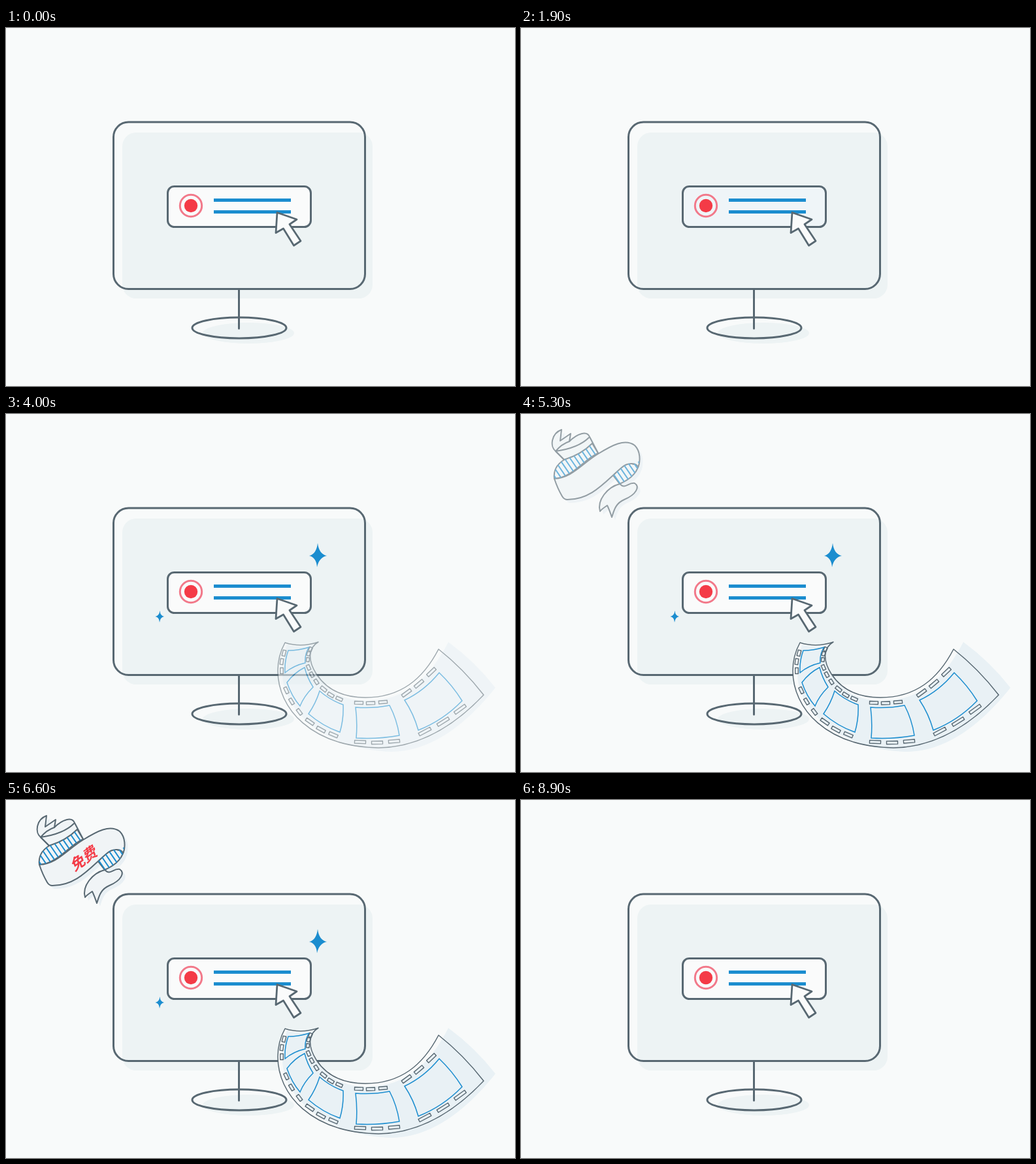
Write an HTML page that moves like this. It is 779 px wide and 548 px high and loops after 9.1 s.

```html
<!DOCTYPE html>
<html lang="zh">
<head>
<meta charset="utf-8">
<style>
html, body { margin: 0; width: 100%; height: 100%; overflow: hidden; background: #f8fafa; }
svg { display: block; width: 779px; height: 548px; }
.ink { stroke: #586872; stroke-linejoin: round; stroke-linecap: round; }
.blue { stroke: #1b8dcf; }
text { font: bold 22.5px "Noto Sans CJK SC", "Noto Sans CJK", sans-serif; fill: #f43b47; text-anchor: middle; }
</style>
</head>
<body>
<svg viewBox="0 0 779 548" fill="none">
  <defs>
    <clipPath id="foldA"><path d="M51 99C49 84 58 75 66 70Q92 62 109 45L118 60C98 68 78 98 51 99Z"/></clipPath>
    <clipPath id="foldB"><path d="M141 94C152 82 164 72 172 77L181 72C180 90 167 100 151 107Z"/></clipPath>
    <g id="ribbonShape">
      <path d="M53 57C44 50 46 30 62 24L60 41L76 30L74 42C86 30 101 25 105 35L118 60L66 70Z"/>
      <path d="M51 99C49 84 58 75 66 70Q92 62 109 45L118 60C98 68 78 98 51 99Z"/>
      <path d="M141 94C152 82 164 72 172 77L181 72C180 90 167 100 151 107Z"/>
      <path d="M151 107C160 116 164 104 174 106C182 111 177 123 158 131C144 137 142 149 139 158C137 152 135 146 132 140C129 142 124 145 121 149C116 132 132 112 151 107Z"/>
      <path d="M51 99C78 98 92 77 118 61C139 48 159 37 174 48C183 57 183 72 179 82C178 75 164 73 154 82C128 104 108 131 71 131Q66 131 63 126Q56 114 51 99Z"/>
    </g>
    <path id="strip" d="M427 350Q452 358 478 349C462 358 462 378 475 398C492 424 520 434 550 434C604 434 638 406 662 360Q700 390 731 430C695 468 640 510 570 511C466 509 416 450 416 393Q416 370 427 350Z"/>
  </defs>

  <rect x="178" y="160" width="383" height="254" rx="21" fill="#edf3f4"/>
  <ellipse cx="371" cy="467" rx="70" ry="16" fill="#edf3f4"/>
  <g class="ink" stroke-width="3">
    <rect x="164.5" y="144" width="385" height="255.500" rx="23"/>
    <ellipse cx="357" cy="459" rx="72" ry="16"/>
    <path d="M356.5 400V460"/>
    <rect id="panel" x="247.5" y="242.5" width="219" height="62" rx="10"/>
  </g>
  <circle cx="283" cy="272" r="16.7" stroke="#f2798a" stroke-width="3"/>
  <circle cx="283" cy="272" r="10.2" fill="#f43b47"/>
  <path class="blue" d="M318 263.5H436M318 281.5H436" stroke-width="5"/>

  <g id="sparks" fill="#1b8dcf">
    <path d="M477 198Q479 215 491 217.500Q479 220 476 235Q475 220 464 217.500Q475 215 477 198Z" transform="translate(0 -.5)"/>
    <path d="M235.500 301Q236 309 242 310Q236 311 235 319Q234.500 311 228.500 310Q234.500 309 235.500 301Z"/>
  </g>

  <path id="cursor" class="ink" d="M415 282.500L445 293L434 300.500L451 326L440.500 333L424.500 307L413 313.500Z" fill="#fafbfb" stroke-width="2.800"/>

  <g id="film">
    <use href="#strip" fill="#f8fafa"/>
    <path d="M430 353Q452 360 474 352C462 367 467 387 480 406C500 431 526 440 556 439C612 437 648 405 677 349Q718 379 749 419C713 464 660 516 590 517C486 514 423 451 423 398Q423 373 430 353Z" fill="#e9f1f5"/>
    <use href="#strip" class="ink" stroke-width="1.500"/>
    <path class="blue" stroke-width="1.500" d="M432 362Q448 362 464 357Q457 367 458 381Q440 385 427 396Q426 378 432 362Z
      M430 411Q441 396 457 388Q461 404 470 418Q456 432 450 447Q437 432 430 411Z
      M480 424Q496 438 516 445Q517 467 511 487Q485 478 463 459Q474 443 480 424Z
      M535 449Q562 451 587 446Q598 467 602 492Q569 498 536 496Q538 472 535 449Z
      M610 438Q640 424 663 396Q683 415 698 439Q669 469 631 484Q624 459 610 438Z"/>
    <path id="holes" class="ink" stroke-width="1.400"/>
  </g>

  <g id="ribbon">
    <use href="#ribbonShape" x="5" y="5" fill="#e9f0f4"/>
    <use href="#ribbonShape" class="ink" fill="#f0f4f6" stroke-width="2"/>
    <path class="ink" d="M53 57Q62 46 74 42M53 57L66 70M53 57C74 54 92 48 104 36" stroke-width="2"/>
    <path class="blue" clip-path="url(#foldA)" id="stripesA" stroke-width="2"/>
    <path class="blue" clip-path="url(#foldB)" id="stripesB" stroke-width="2"/>
  </g>
  <g id="label"><text transform="translate(120 89) rotate(-36) skewX(-16)" y="8">免费</text></g>
</svg>
<script>
const $ = id => document.getElementById(id);
const clamp = v => Math.max(0, Math.min(1, v));
const ramp = (t, a, b) => clamp((t - a) / (b - a));
const mix = (a, b, k) => a + (b - a) * k;

// Perforations: three centres per group, then the length of each hole
const groups = [
  [425.5, 366, 422, 379, 422, 393, 9],
  [466, 360, 463, 367, 462, 376, 6],
  [429, 423, 437, 440, 449, 456, 10],
  [463, 388, 468, 399, 475, 410, 8],
  [465, 471, 482, 483, 501, 491, 14],
  [486, 421, 497, 430, 510, 436, 10],
  [542, 502, 568, 503, 594, 501, 17],
  [540, 442, 558, 442.5, 577, 441, 13],
  [641, 486, 669, 471, 695, 452, 20],
  [613, 427, 632, 413, 651, 395, 16]
];

function hole(x, y, angle, length) {
  const c = Math.cos(angle), s = Math.sin(angle), w = length / 2, h = 2.3;
  const corners = [[-w, -h], [w, -h], [w, h], [-w, h]];
  return "M" + corners.map(([u, v]) => `${x + u * c - v * s} ${y + u * s + v * c}`).join("L") + "Z";
}

$("holes").setAttribute("d", groups.map(([ax, ay, bx, by, cx, cy, len]) =>
  hole(ax, ay, Math.atan2(by - ay, bx - ax), len) +
  hole(bx, by, Math.atan2(cy - ay, cx - ax), len) +
  hole(cx, cy, Math.atan2(cy - by, cx - bx), len)).join(""));

const stripes = (n, x, y, dx, dy) =>
  Array.from({ length: n }, (_, i) => `M${x + i * dx} ${y + i * dy}l22 32`).join("");
$("stripesA").setAttribute("d", stripes(12, 38, 76, 6, -3.7));
$("stripesB").setAttribute("d", stripes(7, 136, 84, 6, -3.7));

function cursorOffset(t) {
  if (t < 700) return [0, 0];
  const fly = ramp(t, 700, 1400), settle = ramp(t, 1400, 1700);
  return t < 1400 ? [mix(89, -11, fly), mix(52, -13, fly)]
                  : [mix(-11, 0, settle), mix(-13, 0, settle)];
}

function draw(t) {
  const out = 1 - ramp(t, 7920, 8900);
  const show = (id, alpha) => $(id).setAttribute("opacity", alpha);
  const place = (id, value) => $(id).setAttribute("transform", value);

  place("cursor", `translate(${cursorOffset(t)})`);
  show("cursor", t < 700 ? 1 : ramp(t, 600, 1150));

  const flash = clamp(1 - Math.abs(t - 2050) / 250);
  $("panel").setAttribute("fill", `rgb(${mix(250, 222, flash)},${mix(251, 236, flash)},${mix(251, 244, flash)})`);

  show("sparks", t < 2600 ? 0 : mix(0.3, 1, ramp(t, 2600, 3600)) * out);
  show("film", ramp(t, 3500, 4400) * out);

  show("ribbon", t < 5300 ? 0 : mix(0.63, 1, ramp(t, 5300, 5600)) * out);
  place("ribbon", `rotate(${11 * Math.sin(4 * Math.PI * ramp(t, 5300, 6200))} 116 92)`);

  const pop = ramp(t, 6200, 6600);
  show("label", pop * out);
  place("label", `translate(120 89) scale(${mix(1.08, 1, pop)}) translate(-120 -89)`);
}

const start = performance.now();
function tick() {
  const t = (performance.now() - start) % 9100;
  draw(Math.floor(t / 100) * 100); // ten poses per second
  requestAnimationFrame(tick);
}
tick();
</script>
</body>
</html>
```
